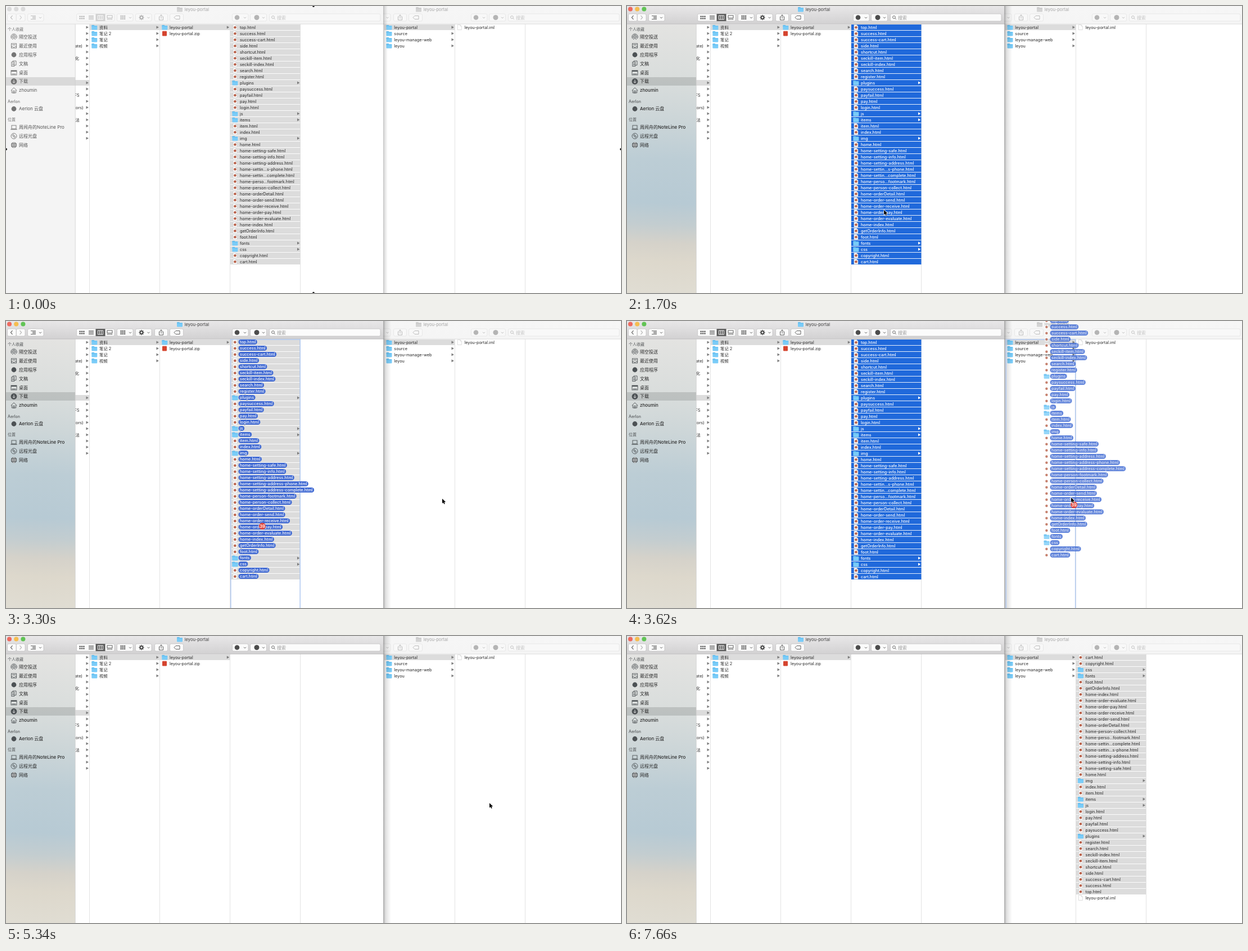
An HTML page with a canvas for the animation above (8 s loop, 1094x512 px).

```html
<!DOCTYPE html>
<html lang="zh">
<head>
<meta charset="utf-8">
<title>File manager: dragging files between windows</title>
<style>
html, body { margin: 0; width: 100%; height: 100%; overflow: hidden; background: #fff; }
canvas { display: block; width: 1094px; height: 512px; }
</style>
</head>
<body>
<canvas id="stage" width="1094" height="512"></canvas>
<script>
const ctx = document.getElementById('stage').getContext('2d');
const W = 1094, H = 512, LOOP = 8000, ROW = 11;
const FONT = 'Inter, "Noto Sans CJK SC", "Noto Sans", sans-serif';
const GRAY = '#dcdcdc', BLUE = '#2069db', PILL = '#3d68d3', INK = '#262626';

const T = { handles: 100, enter: 520, activate: 1000, lift: 3290, follow: 3400,
  gather: 4240, gathered: 4320, drop: 4600, dropped: 5060, moved: 5340,
  listed: 5640, icons: 5880, leave: 7660 };

const files = ('top success success-cart side shortcut seckill-item seckill-index search register plugins/ ' +
  'paysuccess payfail pay login js/ items/ item index img/ home home-setting-safe home-setting-info ' +
  'home-setting-address home-setting-address-phone home-setting-address-complete home-person-footmark ' +
  'home-person-collect home-orderDetail home-order-send home-order-receive home-order-pay ' +
  'home-order-evaluate home-index getOrderInfo foot fonts/ css/ copyright cart')
  .split(' ').map(s => {
    const dir = s.endsWith('/');
    const name = dir ? s.slice(0, -1) : s + '.html';
    const short = name.replace('home-setting-address-phone', 'home-settin...s-phone')
      .replace('home-setting-address-complete', 'home-settin...complete')
      .replace('home-person-footmark', 'home-perso...footmark');
    return { name, short, dir };
  });
const reversed = files.slice().reverse();

// cursor path: time, x, y of the tip
const path = [[520, 540, 512], [1300, 457, 489], [1340, 457, 489], [1460, 457, 364],
  [1700, 457, 364], [2460, 597, 343], [3300, 776, 317], [3400, 776, 317], [3620, 790, 315],
  [4140, 822, 313], [4240, 822, 313], [4320, 858, 296], [4600, 858, 296], [5060, 860, 298],
  [5800, 860, 298], [6320, 751, 162], [6860, 751, 162], [7100, 520, 160], [7420, 520, 160],
  [7660, 537, 405]];

const clamp = v => Math.max(0, Math.min(1, v));
const mix = (a, b, u) => a + (b - a) * u;
const span = (t, a, b) => clamp((t - a) / (b - a));

function cursorAt(t) {
  let i = 0;
  while (i < path.length - 2 && t > path[i + 1][0]) i++;
  const [a, b] = [path[i], path[i + 1]], u = span(t, a[0], b[0]);
  return [mix(a[1], b[1], u), mix(a[2], b[2], u)];
}

function rect(x, y, w, h, color) {
  ctx.fillStyle = color;
  ctx.fillRect(x, y, w, h);
}

function round(x, y, w, h, r, fill, line) {
  ctx.beginPath();
  ctx.roundRect(x, y, w, h, r);
  if (fill) { ctx.fillStyle = fill; ctx.fill(); }
  if (line) { ctx.strokeStyle = line; ctx.stroke(); }
}

function disc(x, y, r, color) {
  ctx.beginPath();
  ctx.arc(x, y, r, 0, 7);
  ctx.fillStyle = color;
  ctx.fill();
}

function ring(x, y, r, a = 0, b = Math.PI * 2) {
  ctx.beginPath();
  ctx.arc(x, y, r, a, b);
  ctx.stroke();
}

function line(...p) {
  ctx.beginPath();
  for (let i = 0; i < p.length; i += 2) ctx.lineTo(p[i], p[i + 1]);
  ctx.stroke();
}

// text is laid out large and scaled down so that advances stay fractional
function text(s, x, y, color, size = 7.3, weight = 400, align = 'left') {
  ctx.save();
  ctx.translate(x, y + size * .36);
  ctx.scale(.1, .1);
  ctx.font = `${weight} ${size * 10}px ${FONT}`;
  ctx.textAlign = align;
  ctx.fillStyle = color;
  ctx.fillText(s, 0, 0);
  const w = ctx.measureText(s).width / 10;
  ctx.restore();
  return w;
}

function textWidth(s, size, weight) {
  ctx.font = `${weight} ${size * 10}px ${FONT}`;
  return ctx.measureText(s).width / 10;
}

function folder(x, y, dim) {
  round(x, y - 4, 5, 3, 1, dim ? '#c9c9c9' : '#55b3e8');
  round(x, y - 3, 10, 7.4, .8, dim ? '#d4d4d4' : '#7accf8');
  rect(x + .4, y - 1.8, 9.2, .6, dim ? '#c2c2c2' : '#5dbbee');
}

function page(x, y) {
  ctx.lineWidth = .5;
  ctx.beginPath();
  [[0, -4.5], [4.6, -4.5], [7, -2.1], [7, 4.5], [0, 4.5]].forEach(p => ctx.lineTo(x + p[0], y + p[1]));
  ctx.closePath();
  ctx.fillStyle = '#fff';
  ctx.fill();
  ctx.strokeStyle = '#bdbdbd';
  ctx.stroke();
  line(x + 4.6, y - 4.5, x + 4.6, y - 2.1, x + 7, y - 2.1);
}

function arrow(x, y, color = '#7c7c7c') {
  ctx.beginPath();
  ctx.moveTo(x - 2, y - 2.5);
  ctx.lineTo(x + 2.4, y);
  ctx.lineTo(x - 2, y + 2.5);
  ctx.fillStyle = color;
  ctx.fill();
}

function fileIcon(f, x, y, known = true) {
  if (f.dir) return folder(x - 5, y);
  page(x - 3.5, y);
  if (known) disc(x, y + .3, 2.3, '#b8614a');
}

function fileList(list, x, fill, known) {
  const on = fill === BLUE;
  list.forEach((f, i) => {
    const y = 38 + i * ROW;
    rect(x, y - 5, 124.5, 10.1, fill);
    fileIcon(f, x + 8.4, y, known);
    text(f.short, x + 17, y, on ? '#fff' : INK, on ? 7.2 : 7.3, on ? 500 : 400);
    if (f.dir) arrow(x + 121, y, on ? '#fff' : undefined);
  });
}

function folderColumn(names, x, right) {
  rect(x, 33, right - x, 10, GRAY);
  names.forEach((n, i) => {
    folder(x + 3.5, 38 + i * ROW);
    text(n, x + 17.3, 38 + i * ROW, INK);
    arrow(right - 3.5, 38 + i * ROW);
  });
}

function chevron(x, ink) {
  ctx.strokeStyle = ink;
  ctx.lineWidth = .9;
  line(x - 2, 19.8, x, 21.8, x + 2, 19.8);
}

function toolbar(dx, active) {
  const ink = active ? '#4c4c4c' : '#b4b4b4';
  ctx.save();
  ctx.translate(dx, 0);
  const bar = ctx.createLinearGradient(0, 0, 0, 32);
  bar.addColorStop(0, active ? '#e8e7e8' : '#f6f6f6');
  bar.addColorStop(1, active ? '#d2d1d2' : '#f5f5f5');
  rect(0, 0, 671, 32, bar);
  rect(0, 31.7, 671, .8, active ? '#b3b2b3' : '#d6d6d6');

  ['#ee6a5f', '#f5bd4f', '#61c455'].forEach((c, i) => disc(6 + i * 12.2, 5.6, 4, active ? c : '#dbdbdb'));
  folder(304, 6, !active);
  text('leyou-portal', 317.7, 6, active ? '#3c3c3c' : '#a4a4a4', 7.6);

  const edge = active ? '#bdbcbd' : '#e1e1e1';
  ctx.lineWidth = .7;
  for (const [x, w] of [[2.5, 15.5], [18.5, 15.5], [38.5, 28.5], [125.5, 67.5], [197.5, 28.5],
    [230.5, 28.5], [264.5, 23], [291.5, 24], [402.5, 28.5], [434.5, 29], [468.5, 197.5]])
    round(x, 14, w, 13, 2.3, active ? '#fbfbfb' : '#f8f8f8', edge);

  ctx.strokeStyle = ink;
  ctx.lineWidth = 1.1;
  line(11.5, 17, 8.5, 20.5, 11.5, 24);
  ctx.strokeStyle = active ? '#aaa' : '#c8c8c8';
  line(24.5, 17, 27.5, 20.5, 24.5, 24);

  [44, 47, 47, 44].forEach((x, i) => rect(x, 17.2 + i * 2, 53 - x, .9, ink));
  for (let i = 0; i < 6; i++) rect(130.5 + i % 3 * 3.4, 17.6 + (i / 3 | 0) * 3.6, 2.3, 2.3, ink);
  for (let i = 0; i < 4; i++) rect(147, 17 + i * 2.1, 9, .9, ink);
  rect(159.5, 14, 17, 13, active ? '#5d5d5d' : '#d2d2d2');
  ctx.strokeStyle = '#fff';
  ctx.lineWidth = .9;
  ctx.strokeRect(163.5, 17, 9, 7);
  line(166.5, 17, 166.5, 24);
  line(169.5, 17, 169.5, 24);
  ctx.strokeStyle = ink;
  ctx.strokeRect(180, 17, 9, 4.5);
  for (let i = 0; i < 4; i++) rect(179.8 + i * 2.5, 23, 1.7, 1.3, ink);
  for (let i = 0; i < 9; i++) rect(203.5 + i % 3 * 3.2, 16.8 + (i / 3 | 0) * 2.7, 2.3, 1.8, ink);

  disc(241, 20.5, 3.6, ink);
  ctx.lineWidth = 1.2;
  for (let a = 0; a < 8; a++) {
    const c = Math.cos(a * Math.PI / 4), s = Math.sin(a * Math.PI / 4);
    line(241 + c * 3, 20.5 + s * 3, 241 + c * 4.7, 20.5 + s * 4.7);
  }
  disc(241, 20.5, 1.4, '#fafafa');

  ctx.lineWidth = .9;
  line(274, 19, 272.5, 19, 272.5, 25, 279.5, 25, 279.5, 19, 278, 19);
  line(276, 22.5, 276, 15.8);
  line(274, 17.7, 276, 15.7, 278, 17.7);
  ctx.beginPath();
  [[299, 20.5], [302, 17.5], [309, 17.5], [309, 23.5], [302, 23.5]].forEach(p => ctx.lineTo(...p));
  ctx.closePath();
  ctx.stroke();

  disc(411, 20.5, 4.3, ink);
  disc(446, 20.5, 4.5, ink);
  [61, 221, 253.5, 425, 458].forEach(x => chevron(x, ink));
  ctx.lineWidth = .8;
  ring(475, 20, 2.4);
  line(476.8, 21.8, 478.8, 23.8);
  text('搜索', 482, 20.8, active ? '#9a9a9a' : '#c4c4c4', 8);
  ctx.restore();
}

const places = [
  [55, '隔空投送', 'waves'], [71, '最近使用', 'clock'], [87, '应用程序', 'dot'], [103, '文稿', 'docs'],
  [119, '桌面', 'desk'], [134.5, '下载', 'down'], [150.5, 'zhoumin', 'home'],
  [183.5, 'Aerlon 云盘', 'dot'], [216.5, '周闻舟的NoteLine Pro', 'laptop'],
  [232, '远程光盘', 'disk'], [248, '网络', 'globe']];

const glyphs = {
  waves(y) { [1.6, 3.4, 5.2].forEach(r => ring(14, y, r, 2.4, 7)); line(14, y + 1, 11.5, y + 5); line(14, y + 1, 16.5, y + 5); },
  clock(y) { ctx.strokeRect(9.5, y - 4, 9, 8); line(9.5, y + 1.5, 12, y + 1.5, 13, y + 2.7, 15, y + 2.7, 16, y + 1.5, 18.5, y + 1.5); line(11, y - 1.6, 17, y - 1.6); },
  dot(y, c) { disc(14, y, 4.4, c); },
  docs(y) { ctx.strokeRect(9.8, y - 3, 5, 7.5); line(12, y - 3, 12, y - 5, 18, y - 5, 18, y + 2.5, 15, y + 2.5); line(11, y, 14, y); line(11, y + 2, 14, y + 2); },
  desk(y, c) { ctx.strokeRect(9, y - 4, 10, 8); rect(9, y - 4, 10, 2, c); rect(10.5, y + 1.8, 7, 1, c); },
  down(y, c) { disc(14, y, 5.4, c); ctx.strokeStyle = '#eee'; line(14, y - 3, 14, y + 2.6); line(11.7, y + .4, 14, y + 2.8, 16.3, y + .4); },
  home(y) { line(8.7, y + .3, 14, y - 4.8, 19.3, y + .3); line(10.3, y - .6, 10.3, y + 4.5, 17.7, y + 4.5, 17.7, y - .6); ctx.strokeRect(12.8, y + 1, 2.4, 3.5); },
  laptop(y, c) { ctx.strokeRect(10, y - 3.5, 8, 6); rect(8.3, y + 3, 11.4, 1.2, c); },
  disk(y) { ring(14, y, 5); ring(14, y, 1.5); ring(14, y, 3.2, 3.4, 4.6); ring(14, y, 3.2, .2, 1.4); },
  globe(y, c) { disc(14, y, 5.2, c); ctx.strokeStyle = '#ddd'; line(9, y, 19, y); line(14, y - 5, 14, y + 5); ctx.beginPath(); ctx.ellipse(14, y, 2.5, 5, 0, 0, 7); ctx.stroke(); }
};

function sidebar(active, tint) {
  rect(0, 32.5, 123, H, '#f4f4f4');
  if (tint) {
    const g = ctx.createLinearGradient(0, 33, -14, 512);
    [[0, '#e3e3e1'], [.2, '#d9dddc'], [.34, '#cdd6d8'], [.5, '#bccdd5'], [.66, '#b7cad4'],
      [.74, '#c3cdd0'], [.81, '#d5d2ca'], [.88, '#ddd8cc'], [1, '#e0ddd3']].forEach(s => g.addColorStop(...s));
    ctx.globalAlpha = tint;
    rect(0, 32.5, 123, H, g);
    ctx.globalAlpha = 1;
  }
  rect(0, 127, 123, 15, active ? 'rgba(0,0,0,.13)' : '#d9d9d9');
  const label = active ? '#282828' : '#575757', icon = active ? '#4d5255' : '#757575';
  [[41, '个人收藏'], [170, 'Aerlon'], [202, '位置']].forEach(([y, s]) =>
    text(s, 3, y, active ? '#55585a' : '#777', 7, 500));
  for (const [y, s, kind] of places) {
    ctx.strokeStyle = icon;
    ctx.lineWidth = .9;
    glyphs[kind](y, icon);
    text(s, 23, y, label, 8, active ? 500 : 400);
  }
  rect(122.8, 32.5, .8, H, '#cdcdcd');
}

function leftWindow(t, active) {
  const reach = active ? 14 : 8;
  const g = ctx.createLinearGradient(671, 0, 671 + reach, 0);
  g.addColorStop(0, active ? 'rgba(0,0,0,.33)' : 'rgba(0,0,0,.24)');
  g.addColorStop(.3, 'rgba(0,0,0,.12)');
  g.addColorStop(1, 'rgba(0,0,0,0)');
  rect(671, 0, reach, H, g);
  rect(0, 0, 671, H, '#fff');

  ctx.save();
  ctx.beginPath();
  ctx.rect(123, 32, 26, H);
  ctx.clip();
  rect(123, 132, 25, 10, GRAY);
  [[71, 136, 'mate)'], [93, 130, '优化'], [159, 130.5, 'DFS'], [181, 137.7, 'ctors)'], [203, 130.7, '方法']]
    .forEach(([y, x, s]) => text(s, x, y, INK, 7.3, 400, 'right'));
  for (let i = 0; i < 19; i++) arrow(144.5, 38 + i * ROW);
  ctx.restore();

  [148, 273, 398, 523].forEach(x => rect(x, 32, .9, H, '#e0e0e0'));
  folderColumn(['资料', '笔记 2', '笔记', '视频'], 148.8, 273);
  folderColumn(['leyou-portal'], 273.8, 398.3);
  round(278, 44.8, 8, 8.6, 1, '#d5442f');
  text('leyou-portal.zip', 291, 49, INK);

  if (t < T.moved) {
    const lifted = t >= T.lift && t < T.follow;
    fileList(files, 399, active && !lifted ? BLUE : GRAY, true);
  }
  sidebar(active, span(t, T.activate, T.activate + 200));
  toolbar(0, active);
}

function rightWindow(t) {
  rect(0, 0, W, H, '#fff');
  toolbar(425, false);
  [798, 923].forEach(x => rect(x, 32, .9, H, '#e0e0e0'));
  folderColumn(['leyou-portal', 'source', 'leyou-manage-web', 'leyou'], 673, 798);
  const listed = t >= T.listed, y = listed ? 38 + files.length * ROW : 38;
  if (listed) fileList(reversed, 798.6, GRAY, t >= T.icons);
  page(803.3, y);
  text('leyou-portal.iml', 815.4, y, INK);
}

function dropTarget(t, cx) {
  if (t < T.lift || t >= T.dropped) return;
  const x = t < T.follow ? 399 : cx < 798 ? 673.5 : 798.5;
  ctx.strokeStyle = '#b4cbf1';
  ctx.lineWidth = 1.6;
  ctx.strokeRect(x + .8, 33, 123.4, H);
}

function dragged(t, cx, cy) {
  if (t < T.lift || t >= T.dropped) return;
  const follow = t >= T.follow;
  const dx = follow ? Math.min(cx, 822) - 451 : 0;
  const dy = follow ? Math.max(cy, 313) - 353 : 0;
  const g = span(t, T.gather, T.gathered), out = span(t, T.drop, T.dropped);
  const x = mix(dx, 450 + 17 * out, g);
  files.forEach((f, i) => {
    const y = mix(37.5 + i * ROW + dy, 264 + i * 9.95, g);
    const fade = clamp(Math.min(.97, .95 - (i - 4) * .14)) * (1 - out);
    ctx.globalAlpha = mix(follow ? .8 : .97, fade, g);
    if (ctx.globalAlpha < .01) return;
    if (f.dir) folder(402.5 + x, y);
    else {
      round(404 + x, y - 4, 7, 8, .5, 'rgba(255,255,255,.7)');
      disc(407.3 + x, y + .3, 2.2, '#b8614a');
    }
    round(413.5 + x, y - 4.6, textWidth(f.name, 7.2, 500) + 5, 9.2, 4.6, PILL);
    text(f.name, 416 + x, y, '#fff', 7.2, 500);
  });
  ctx.globalAlpha = 1 - out;
  const bx = mix(456 + dx, 856, g), by = mix(366 + dy, 308, g);
  disc(bx, by, 6, '#e3473c');
  text('39', bx, by, '#fff', 7.6, 600, 'center');
  ctx.globalAlpha = 1;
}

function pointer(x, y) {
  ctx.beginPath();
  [[0, 0], [0, 8.6], [2, 6.8], [3.3, 9.8], [4.8, 9.1], [3.5, 6.3], [6.2, 6.1]]
    .forEach(p => ctx.lineTo(x + p[0], y + p[1]));
  ctx.closePath();
  ctx.lineJoin = 'round';
  ctx.lineWidth = 1.4;
  ctx.strokeStyle = '#fff';
  ctx.stroke();
  ctx.fillStyle = '#000';
  ctx.fill();
  ctx.lineJoin = 'miter';
}

function draw(t) {
  const [cx, cy] = cursorAt(t);
  rightWindow(t);
  leftWindow(t, t >= T.activate);
  dropTarget(t, cx);
  dragged(t, cx, cy);
  if (t >= T.enter && t < T.leave) pointer(cx, cy);
  if (t < T.handles)
    [[0, 255.5], [547, 0], [547, H], [W, 255.5]].forEach(p => disc(p[0], p[1], 1.9, '#111'));
}

const start = performance.now();
function tick() {
  draw((performance.now() - start) % LOOP);
  requestAnimationFrame(tick);
}
tick();
</script>
</body>
</html>
```
